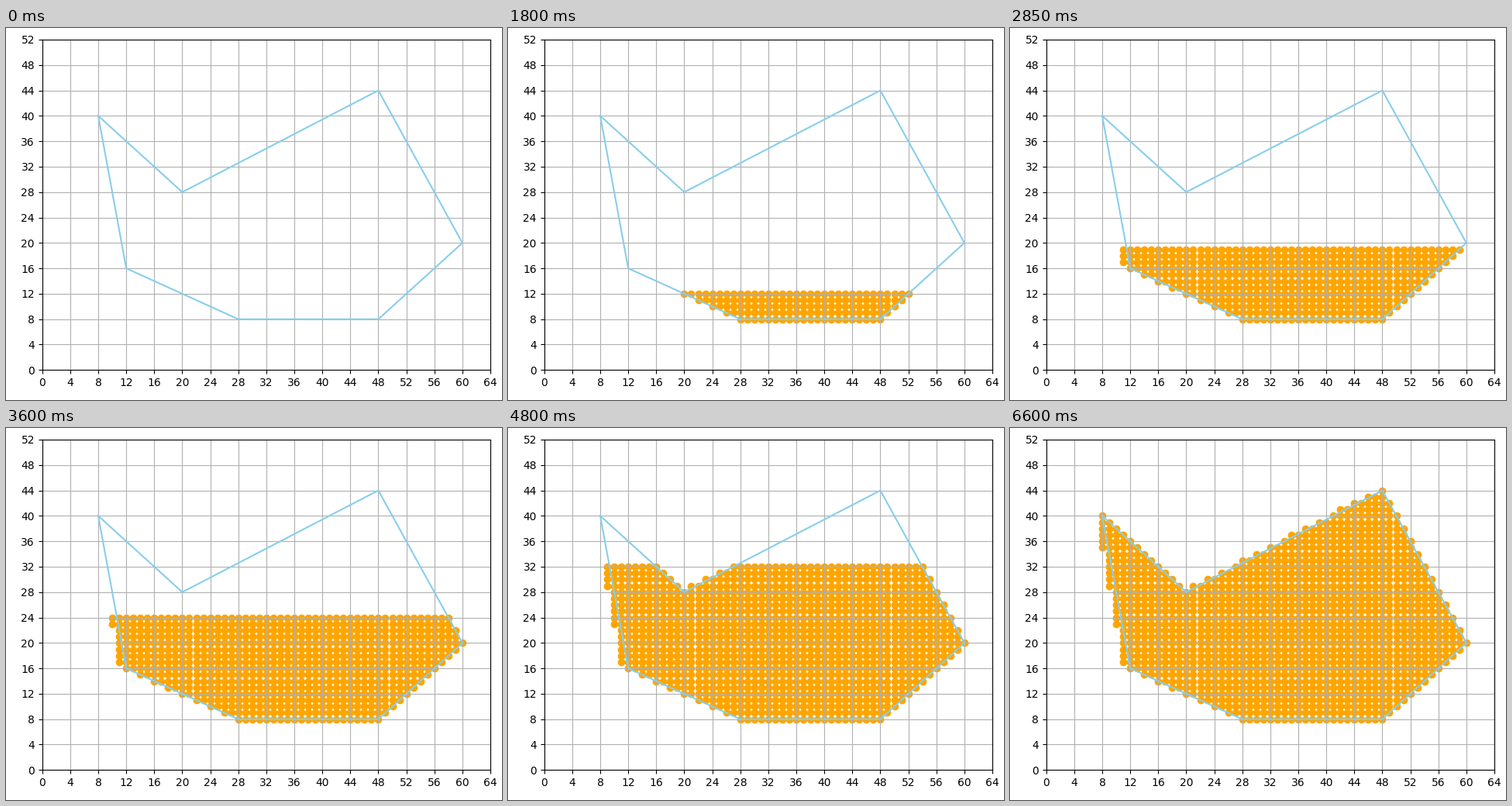
Write a matplotlib script that moves like this. It is 640 px wide and 480 px high and loops after 7.8 s.

```python
import matplotlib.pyplot as plt
import numpy as np
from matplotlib.animation import FuncAnimation

W, H, DPI = 640, 480, 100
STEP_MS, FRAMES = 150, 52
POLYGON = [(8, 40), (12, 16), (28, 8), (48, 8), (60, 20), (48, 44), (20, 28)]
EDGES = list(zip(POLYGON, POLYGON[1:] + POLYGON[:1]))

# Axes margins in pixels
LEFT, RIGHT, BOTTOM, TOP = 46.7222, 15, 38.7222, 15


def crossings(y, include_top):
    """Sorted integer x positions where the scan line meets the outline."""
    xs = []
    for a, b in EDGES:
        (x0, y0), (x1, y1) = sorted((a, b), key=lambda p: p[1])
        if (y0 < y <= y1) if include_top else (y0 <= y < y1):
            xs.append(x0 + (y - y0) * (x1 - x0) // (y1 - y0))
    return sorted(xs)


def scan_row(y):
    """Filled cells of one row; both edge rules together keep every vertex."""
    cells = set()
    for include_top in (False, True):
        xs = crossings(y, include_top)
        for start, end in zip(xs[::2], xs[1::2]):
            cells.update(range(start, end + 1))
    return [(x, y) for x in sorted(cells)]


fig = plt.figure(figsize=(W / DPI, H / DPI), dpi=DPI)
ax = fig.add_axes([LEFT / W, BOTTOM / H,
                   (W - LEFT - RIGHT) / W, (H - BOTTOM - TOP) / H])
ax.set(xlim=(0, 64), ylim=(0, 52),
       xticks=range(0, 65, 4), yticks=range(0, 53, 4))
ax.grid(True)
ax.plot(*zip(*POLYGON, POLYGON[0]), color="skyblue")
dots = ax.scatter([], [], color="orange")


def update(frame):
    # The fill rises one row per step; rows outside the outline are empty
    cells = [cell for y in range(frame + 1) for cell in scan_row(y)]
    dots.set_offsets(np.array(cells, dtype=float).reshape(-1, 2))
    return (dots,)


anim = FuncAnimation(fig, update, frames=FRAMES, interval=STEP_MS,
                     repeat=True, repeat_delay=0, blit=False)
plt.show()
```
